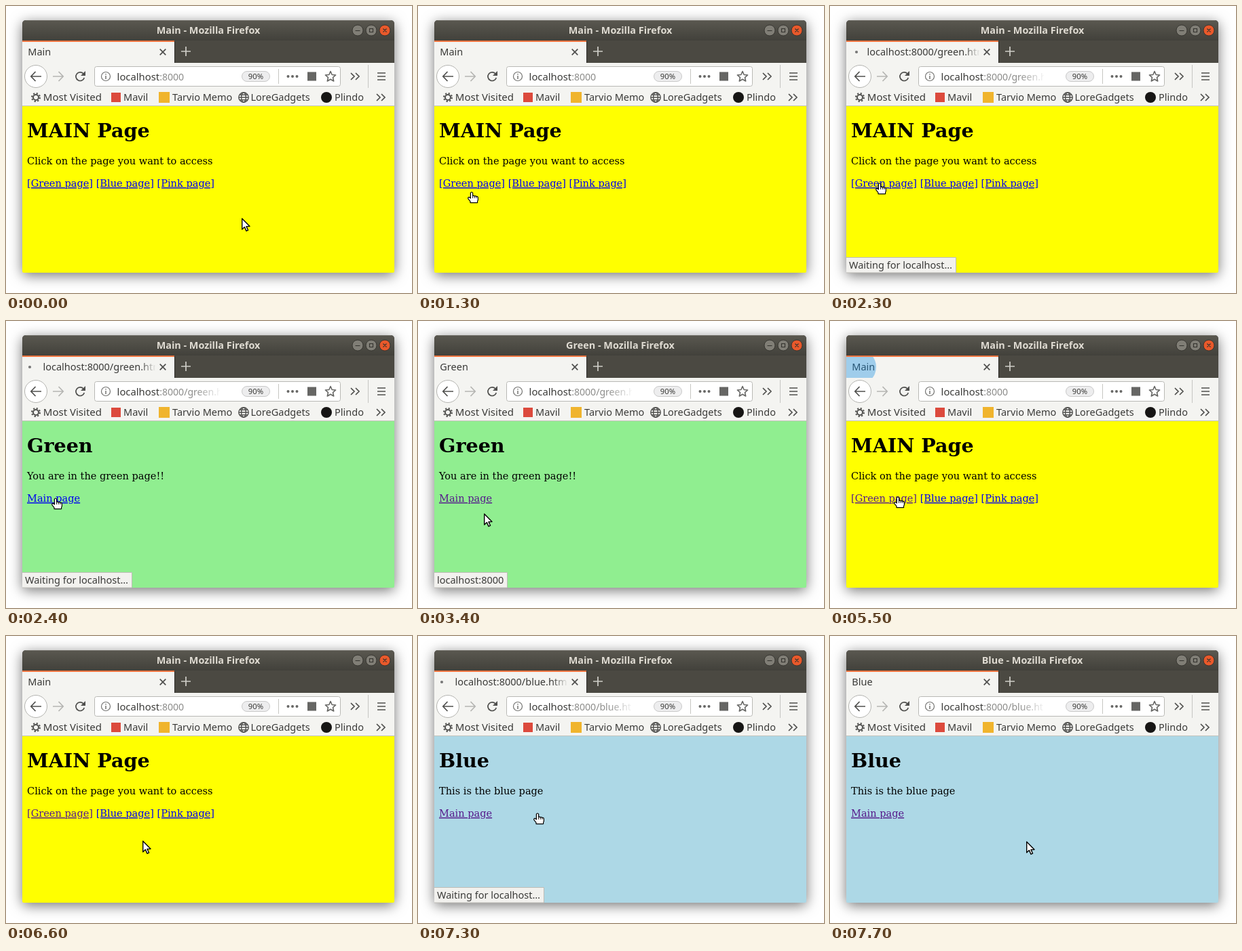
An HTML page that plays this animation: 598x424 px, repeating every 8 s.

```html
<!DOCTYPE html>
<html lang="en">
<head>
<meta charset="utf-8">
<title>Browser walkthrough</title>
<style>
  html, body { margin: 0; width: 100%; height: 100%; overflow: hidden; background: #fff; }
  svg { display: block; width: 598px; height: 424px; }
  .ui { font: 14.5px "Noto Sans", "Open Sans", sans-serif; fill: #3a3a38; }
  .title { font: bold 14.4px "Noto Sans", "Open Sans", sans-serif; fill: #dfdbd2; }
  .page { font: 14.55px "DejaVu Serif", serif; fill: #000; }
  .page .h1 { font-weight: bold; font-size: 28.6px; }
  .link { text-decoration: underline 1px; fill: #0000ee; }
  .seen { fill: #551a8b; }
  .icon { fill: none; stroke: #50504e; stroke-width: 1.7; }
</style>
</head>
<body>
<svg viewBox="0 0 598 424">
  <defs>
    <filter id="shadow" x="-10%" y="-10%" width="120%" height="125%">
      <feDropShadow dx="0" dy="4" stdDeviation="9.5" flood-opacity=".55"/>
    </filter>
    <linearGradient id="bar" x2="0" y2="1">
      <stop stop-color="#5a5850"/><stop offset="1" stop-color="#42413b"/>
    </linearGradient>
    <linearGradient id="urlFade" gradientUnits="userSpaceOnUse" x1="280" x2="318">
      <stop stop-color="#fff" stop-opacity="0"/><stop offset="1" stop-color="#fff"/>
    </linearGradient>
    <linearGradient id="tabFade" gradientUnits="userSpaceOnUse" x1="198" x2="221">
      <stop stop-color="#f4f4f1" stop-opacity="0"/><stop offset="1" stop-color="#f4f4f1"/>
    </linearGradient>
    <clipPath id="tabClip"><rect x="24" y="53" width="224" height="31"/></clipPath>
    <clipPath id="labelClip"><rect x="24" y="54" width="196" height="30"/></clipPath>
    <clipPath id="urlClip"><rect x="160" y="92" width="155" height="25"/></clipPath>
    <clipPath id="win"><path d="M24 394V27Q24 21 30 21H566Q572 21 572 27V392Q572 394 570 394H26Q24 394 24 392Z"/></clipPath>
  </defs>

  <rect width="598" height="424" fill="#fff"/>
  <rect x="24" y="21" width="548" height="373" rx="5" fill="#42413b" filter="url(#shadow)"/>

  <g clip-path="url(#win)">
    <rect x="24" y="21" width="548" height="30" fill="url(#bar)"/>
    <path d="M24 21.5H572" stroke="#6b6961"/>
    <rect x="24" y="51" width="548" height="33" fill="#4b4942"/>
    <rect x="24" y="52" width="224" height="32" fill="#f4f4f1"/>
    <rect x="24" y="51" width="224" height="2" fill="#f0743f"/>
    <path d="M248.5 52V84" stroke="#2b2a26"/>
    <rect x="24" y="84" width="548" height="64" fill="#f4f4f1"/>
    <rect id="paper" x="24" y="148" width="548" height="246"/>
    <path d="M24 147.5H572" stroke="#c4c4bd"/>
  </g>

  <text id="title" class="title" x="298" y="41" text-anchor="middle"></text>
  <g stroke="#33322d" stroke-width=".9">
    <circle cx="518" cy="36" r="8" fill="#807e76"/>
    <circle cx="538" cy="36" r="8" fill="#807e76"/>
    <circle cx="558" cy="36" r="8" fill="#e9592b"/>
    <path fill="none" stroke-width="1.1" d="M514.5 36.5H521.5M535.5 33.5H540.5V38.5H535.5ZM555.5 33.5L560.5 38.5M560.5 33.5L555.5 38.5"/>
  </g>

  <!-- tab strip -->
  <g clip-path="url(#labelClip)"><text id="label" class="ui" y="73"></text></g>
  <rect x="198" y="55" width="23" height="28" fill="url(#tabFade)"/>
  <circle id="dot" cy="68" r="2.1" fill="#777"/>
  <circle id="burst" cx="41.5" cy="68" fill="#0b88e0" clip-path="url(#tabClip)"/>
  <path class="icon" d="M226.7 63.7L235.3 72.3M235.3 63.7L226.7 72.3"/>
  <path class="icon" style="stroke:#cfcec8" d="M258 67H272M265 60V74"/>

  <!-- navigation -->
  <circle cx="44" cy="104" r="16.5" fill="#fff" stroke="#b4b4b0"/>
  <path class="icon" d="M52 104H37M43.5 97L36.8 104L43.5 111"/>
  <path class="icon" style="stroke:#b5b5b2" d="M69 104H84M77.5 97L84.2 104L77.5 111"/>
  <path class="icon" d="M114 100A6.3 6.3 0 1 0 115.3 106"/>
  <path d="M117 96V103H110Z" fill="#50504e"/>
  <rect x="130.5" y="89.5" width="362" height="29" rx="3" fill="#fff" stroke="#b9b9b5"/>
  <circle class="icon" cx="147" cy="104" r="6.5" style="stroke:#737371;stroke-width:1.2"/>
  <path class="icon" style="stroke:#737371;stroke-width:1.5" d="M147 103V108M147 100V101.6"/>
  <g clip-path="url(#urlClip)">
    <text class="ui" x="163.6" y="109.5"><tspan style="font-size:14.8px">localhost</tspan><tspan id="path" fill="#8d8d8b" style="font-size:14.1px"></tspan></text>
  </g>
  <rect x="280" y="92" width="38" height="25" fill="url(#urlFade)"/>
  <rect x="347.5" y="96.5" width="41" height="15" rx="7.5" fill="#ededee" stroke="#c9c9c9"/>
  <text class="ui" x="368" y="108" text-anchor="middle" style="font-size:11.3px">90%</text>
  <path d="M401.5 93V115M533.5 87V121" stroke="#c6c6c2"/>
  <g fill="#666664">
    <circle cx="415.5" cy="104" r="2"/><circle cx="422" cy="104" r="2"/><circle cx="428.5" cy="104" r="2"/>
    <rect x="444" y="97.5" width="13" height="13"/>
  </g>
  <path id="star" class="icon" style="stroke:#666664;stroke-width:1.6;stroke-linejoin:round"/>
  <path class="icon" d="M508 99L513 104L508 109M515 99L520 104L515 109M547 99H559M547 104H559M547 109H559"/>

  <!-- bookmarks -->
  <circle class="icon" cx="44" cy="135" r="4" style="stroke-width:2"/>
  <circle class="icon" cx="44" cy="135" r="6" style="stroke-width:2;stroke-dasharray:2.2 2.512"/>
  <rect x="155" y="128" width="14" height="14" fill="#dc4a3d"/>
  <rect x="225" y="127" width="16" height="16" fill="#f0b42d"/>
  <g class="icon" style="stroke-width:1.4">
    <circle cx="350" cy="135" r="7.2"/><ellipse cx="350" cy="135" rx="3.4" ry="7.2"/>
    <path d="M343 135H357M344 131.3H356M344 138.7H356"/>
  </g>
  <circle cx="472" cy="135" r="8" fill="#161514"/>
  <g class="ui">
    <text x="54.8" y="140" style="font-size:15px">Most Visited</text>
    <text x="173" y="140">Mavil</text>
    <text x="245" y="140">Tarvio Memo</text>
    <text x="360.5" y="140">LoreGadgets</text>
    <text x="484" y="140">Plindo</text>
  </g>
  <path class="icon" d="M546 130L551 135L546 140M553 130L558 135L553 140"/>

  <g id="page" class="page"></g>
  <g id="status">
    <path id="panel" fill="#f2f1ee" stroke="#bdbcb6"/>
    <text id="note" class="ui" x="28" y="388"></text>
  </g>

  <g id="cursor" stroke="#000" stroke-linejoin="round" fill="#fff">
    <path id="arrow" stroke-width="1.4" d="M.7 1V17L4.4 13.6L7 19.4L9.6 18.2L7 12.6H12Z"/>
    <g id="hand" stroke-width="1.2">
      <path d="M-1.6 1Q0 -1 1.6 1V5.4Q3.2 4.6 4.3 5.8Q6 5 6.9 6.5Q9 6 9.4 8V12L8.6 13V15.6H-2V13.6L-5.2 9.6Q-5.6 7.4 -3.6 7.4L-1.6 9Z"/>
      <path fill="none" stroke-width=".9" d="M1.6 5.5V9M4.3 6V9M6.9 6.6V9"/>
    </g>
  </g>
</svg>

<script>
const $ = id => document.getElementById(id);
const LOOP = 8000, STEP = 100;
const WAIT = 'Waiting for localhost…', HOST = 'localhost:8000';

const link = (text, seen) => `<tspan class="link${seen ? ' seen' : ''}">${text}</tspan>`;
const pages = {
  Main: { color: '#ffff00', path: '', head: 'MAIN Page', text: 'Click on the page you want to access',
    links: seen => `${link('[Green page]', seen)} ${link('[Blue page]')} ${link('[Pink page]')}` },
  Green: { color: '#90ee90', path: '/green.html', head: 'Green', text: 'You are in the green page!!',
    links: seen => link('Main page', seen) },
  Blue: { color: '#add8e6', path: '/blue.html', head: 'Blue', text: 'This is the blue page',
    links: seen => link('Main page', seen) }
};

// Each entry changes some of the properties from its time on.
const events = [
  [0, { page: 'Main', title: 'Main', url: 'Main', seen: false, loading: false, burst: -1, note: '', alpha: 1 }],
  [1500, { note: HOST + '/green.html', alpha: .75 }],
  [1800, { alpha: 1 }],
  [2300, { url: 'Green', loading: 2300, note: WAIT }],
  [2400, { page: 'Green' }],
  [2500, { title: 'Green', loading: false, burst: 2500, seen: true, note: '' }],
  [2800, { note: HOST }],
  [3600, { alpha: .4 }],
  [3800, { note: '', alpha: 1 }],
  [5000, { note: HOST, alpha: .75 }],
  [5100, { alpha: 1 }],
  [5300, { url: 'Main', loading: 5300, note: WAIT }],
  [5400, { page: 'Main' }],
  [5500, { title: 'Main', loading: false, burst: 5500, note: '' }],
  [6900, { note: HOST + '/blue.html', alpha: .75 }],
  [7000, { alpha: 1 }],
  [7200, { url: 'Blue', loading: 7200, note: WAIT }],
  [7300, { page: 'Blue' }],
  [7400, { title: 'Blue', loading: false, burst: 7400, note: '' }]
];

// time, x, y of the pointer tip
const moves = [
  [0, 347, 313], [500, 347, 313], [600, 310, 325], [700, 225, 352], [800, 140, 362], [900, 92, 350],
  [1000, 92, 350], [1200, 85, 305], [1300, 79, 275], [1400, 74, 264], [1500, 73, 262],
  [3000, 73, 262], [3200, 80, 279], [3300, 80, 279], [3600, 132, 294],
  [4100, 132, 294], [4400, 200, 297], [4500, 200, 297], [4700, 142, 295], [4900, 102, 265], [5000, 100, 260],
  [5600, 100, 260], [5800, 199, 304], [6500, 199, 304], [6600, 201, 302], [6900, 176, 262],
  [7400, 176, 262], [7600, 265, 295], [7700, 289, 303], [8000, 289, 303]
];
const handTimes = [[1300, 3100], [4900, 5600], [6800, 7400]];

function pointAt(t) {
  const i = moves.findIndex(m => m[0] > t);
  const [t0, x0, y0] = moves[i - 1], [t1, x1, y1] = moves[i];
  const k = (t - t0) / (t1 - t0);
  return [Math.round(x0 + (x1 - x0) * k), Math.round(y0 + (y1 - y0) * k)];
}

const show = (id, on) => $(id).setAttribute('visibility', on ? 'visible' : 'hidden');

function draw(t) {
  const s = Object.assign({}, ...events.filter(e => e[0] <= t).map(e => e[1]));
  const page = pages[s.page];
  const loading = s.loading !== false;

  $('title').textContent = s.title + ' - Mozilla Firefox';
  $('label').textContent = loading ? HOST + pages[s.url].path : s.title;
  $('label').setAttribute('x', loading ? 54.5 : 32.3);
  $('path').textContent = ':8000' + pages[s.url].path;
  $('paper').setAttribute('fill', page.color);
  $('page').innerHTML = `<text class="h1" x="31" y="194">${page.head}</text>
    <text x="31" y="234">${page.text}</text><text x="31" y="267">${page.links(s.seen)}</text>`;

  show('dot', loading);
  if (loading) $('dot').setAttribute('cx', 39 - (t - s.loading) / 25);

  const k = (t - s.burst) / 300;
  const bursting = s.burst >= 0 && k < 1;
  show('burst', bursting);
  if (bursting) {
    $('burst').setAttribute('r', 26.5 + 195 * k);
    $('burst').setAttribute('opacity', .36 * (1 - k));
  }

  show('status', s.note);
  $('status').setAttribute('opacity', s.alpha);
  $('note').textContent = s.note;
  if (s.note) {
    const right = 23.5 + Math.round($('note').getComputedTextLength() + 10);
    $('panel').setAttribute('d', `M24 371.5H${right}V394H24`);
  }

  const hand = handTimes.some(([a, b]) => t >= a && t <= b);
  show('hand', hand);
  show('arrow', !hand);
  $('cursor').setAttribute('transform', `translate(${pointAt(t)})`);
}

$('star').setAttribute('d', 'M' + Array.from({ length: 10 }, (_, i) => {
  const a = i * Math.PI / 5, r = i % 2 ? 3.7 : 8;
  return `${(478 + r * Math.sin(a)).toFixed(1)} ${(104.5 - r * Math.cos(a)).toFixed(1)}`;
}).join('L') + 'Z');

let last = -1;
const start = performance.now();
function tick() {
  const t = Math.floor((performance.now() - start) % LOOP / STEP) * STEP;
  if (t !== last) draw(last = t);
  requestAnimationFrame(tick);
}
tick();
</script>
</body>
</html>
```
